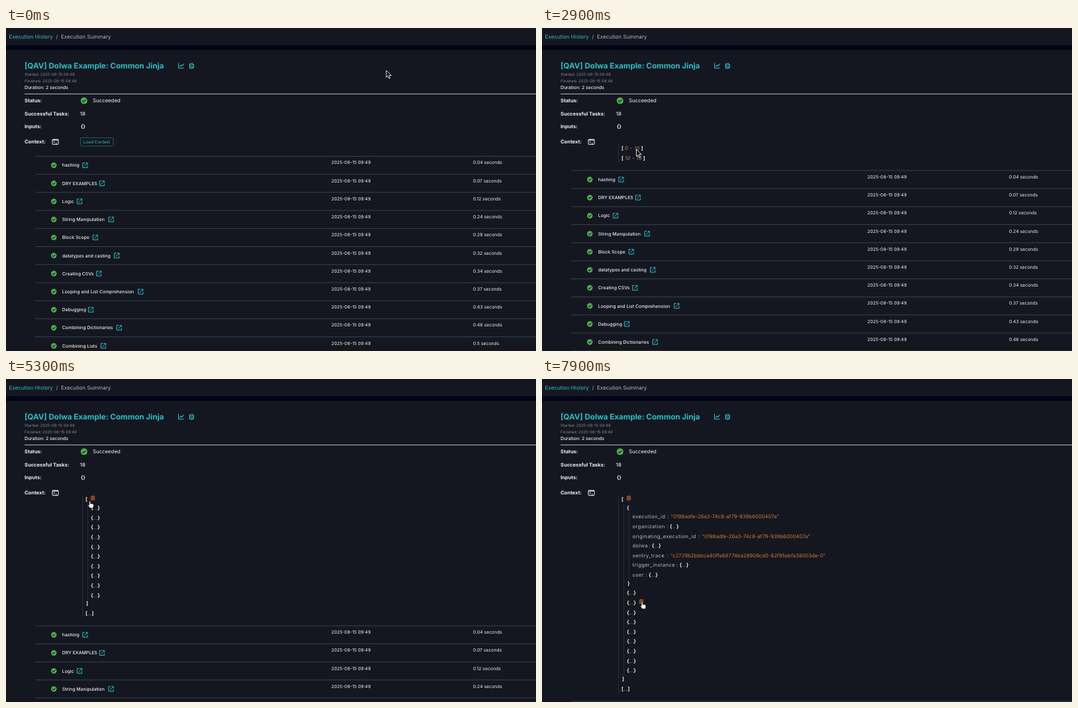
Recreate the animation shown at these times as an HTML page. Size 800x487 px, loop 8000 ms.

```html
<!DOCTYPE html>
<html lang="en">
<head>
<meta charset="utf-8">
<title>Execution Summary</title>
<style>
html, body { margin: 0; width: 100%; height: 100%; overflow: hidden; background: #151720; }
svg { display: block; width: 800px; height: 487px; }
text { font-family: Inter, "Open Sans", sans-serif; white-space: pre; text-rendering: geometricPrecision; }
</style>
</head>
<body>
<svg id="stage" viewBox="0 0 800 487" xmlns="http://www.w3.org/2000/svg"></svg>
<script>
const NS = "http://www.w3.org/2000/svg";
const TEAL = "#2bc0c4", WHITE = "#eceef0", GREY = "#b4b6bc", ORANGE = "#c9782f", BG = "#151720";
const stage = document.getElementById("stage");

function add(parent, tag, attrs, content) {
  const node = document.createElementNS(NS, tag);
  for (const key in attrs) node.setAttribute(key, attrs[key]);
  if (content !== undefined) node.textContent = content;
  parent.appendChild(node);
  return node;
}
const group = (parent = stage) => add(parent, "g", {});

// Text placed by its left edge and the middle of its capitals.
function label(parent, x, mid, content, size, fill = WHITE, weight = 400, extra = {}) {
  return add(parent, "text", { x, y: mid + size * 0.36, "font-size": size, fill, "font-weight": weight, ...extra }, content);
}
function line(parent, d, stroke, width = 1) {
  return add(parent, "path", { d, stroke, "stroke-width": width, fill: "none" });
}
function check(parent, x, y, r) {
  add(parent, "circle", { cx: x, cy: y, r, fill: "#4caf50" });
  line(parent, `M${x - r * .5} ${y}l${r * .36} ${r * .38}l${r * .68} ${-r * .72}`, BG, r * .24);
}
function openIcon(parent, x, y) {
  line(parent, `M${x - .4} ${y - 3.6}H${x - 3.6}V${y + 3.6}H${x + 3.6}V${y + .4}`, TEAL, 1);
  line(parent, `M${x + .8} ${y - 3.6}H${x + 3.6}V${y - .8}M${x + 3.5} ${y - 3.5}L${x - 1.6} ${y + 1.6}`, TEAL, 1);
}

// Page header
add(stage, "rect", { width: 800, height: 487, fill: BG });
add(stage, "rect", { y: 26, width: 800, height: 7, fill: "#030518" });
label(stage, 4.5, 13, "Execution History", 8, TEAL);
label(stage, 75.5, 13, "/", 8, GREY);
label(stage, 83, 13, "Execution Summary", 8, GREY);

// Summary
label(stage, 28, 56.5, "[QAV] Dolwa Example: Common Jinja", 11.6, TEAL, 650);
line(stage, "M260.5 52.8V60.5H268.3M262.2 58.3L264.4 56L265.8 57.2L268.2 54.2", TEAL, 1.1);
add(stage, "rect", { x: 277.6, y: 54, width: 5, height: 6.8, rx: 2.4, fill: "none", stroke: TEAL, "stroke-width": 1.2 });
line(stage, "M276 55H278M276 57.4H278M276 59.8H278M282.2 55H284.2M282.2 57.4H284.2M282.2 59.8H284.2M278.2 52.6L279.3 54M282 52.6L280.9 54M279 56.5H281.2M279 58.5H281.2", TEAL, .9);
label(stage, 28, 69.8, "Started: 2025-08-15 09:49", 5.95, "#85888f");
label(stage, 28, 79.4, "Finished: 2025-08-15 09:49", 5.95, "#85888f");
label(stage, 28, 89.3, "Duration: 2 seconds", 6.9, WHITE, 450);
line(stage, "M28 99.4H800", "#b9bbc0", 1);

[["Status:", 109.6], ["Successful Tasks:", 128.8], ["Inputs:", 148.2], ["Context:", 171.6]]
  .forEach(([name, y]) => label(stage, 28, y, name, 7.55, WHITE, 700));
check(stage, 117.8, 109.6, 5);
label(stage, 131, 109.6, "Succeeded", 7.8);
label(stage, 111.8, 128.8, "18", 7.7, WHITE, 500);
label(stage, 112.8, 148, "{}", 7.6, WHITE, 700);
add(stage, "rect", { x: 70, y: 168, width: 9, height: 7.6, rx: .8, fill: "none", stroke: WHITE, "stroke-width": 1 });
line(stage, "M70 168.8H79", WHITE, 1.4);
line(stage, "M71.8 170.6L73.5 172.2L71.8 173.8M74.6 174H77.2", WHITE, .9);

const button = group();
add(button, "rect", { x: 112.5, y: 165.5, width: 49.5, height: 12.5, rx: 1.5, fill: "none", stroke: "#245a62", "stroke-width": 1 });
label(button, 116.8, 171.8, "Load Context", 6.4, TEAL);

// Task list
const tasks = [
  ["hashing", 119.4, "0.04"], ["DRY EXAMPLES", 144.8, "0.07"], ["Logic", 111, "0.12"],
  ["String Manipulation", 158.6, "0.24"], ["Block Scope", 134.7, "0.29"],
  ["datatypes and casting", 167.2, "0.32"], ["Creating CSVs", 140.2, "0.34"],
  ["Looping and List Comprehension", 203.2, "0.37"], ["Debugging", 128, "0.43"],
  ["Combining Dictionaries", 170.7, "0.46"], ["Combining Lists", 147, "0.5"]
];
const list = group();
tasks.forEach(([name, iconX, secs], i) => {
  const y = 207 + i * 27.22;
  line(list, `M44 ${y - 13.6}H800`, "#31444b", 1);
  check(list, 72.2, y, 4.2);
  label(list, 84.8, y, name, 6.9, WHITE, 500);
  openIcon(list, iconX, y);
  label(list, 491, y - 4, "2025-08-15 09:49", 6.83);
  label(list, 705, y - 4, secs + " seconds", 6.83);
});

// Context tree
const SIZE = 7.7, STEP = 14.6;
const mark = (g, x, y, s) => label(g, x, y, s, SIZE, WHITE, 700);
const guide = (g, x, y1, y2) => line(g, `M${x} ${y1}V${y2}`, "#292d36", 1);
function folded(g, x, y, [open, close], dots) {
  const t = mark(g, x, y, "");
  add(t, "tspan", {}, open);
  add(t, "tspan", { fill: dots, "font-weight": 400 }, "...");
  add(t, "tspan", {}, close);
}
const foldedList = (g, y) => folded(g, 120, y, "[]", GREY);
const foldedItems = (g, y, count) => {
  for (let i = 0; i < count; i++) folded(g, 128, y + i * STEP, "{}", ORANGE);
};
function range(g, y, span, endX) {
  mark(g, 120, y, "[");
  label(g, 125, y, span, SIZE, "#a08c68", 400, { "font-style": "italic", "letter-spacing": .3 });
  mark(g, endX, y, "]");
}

const lines = group();
guide(lines, 115.5, 175, 203);

const firstRange = group(), firstFold = group(), nextRange = group(), nextFold = group();
range(firstRange, 181.2, "0 - 10", 149.6);
foldedList(firstFold, 181.2);
range(nextRange, 195.8, "10 - 19", 152.8);
foldedList(nextFold, 195.8);

const items = group();
guide(items, 115.5, 175, 360);
guide(items, 123.5, 188, 333);
mark(items, 120, 181.2, "[");
foldedItems(items, 194.5, 10);
mark(items, 121, 338.5, "]");
foldedList(items, 353);

const detail = group();
guide(detail, 115.5, 175, 474);
guide(detail, 123.5, 188, 447);
guide(detail, 131.5, 201, 303);
mark(detail, 120, 181.2, "[");
mark(detail, 128, 194.5, "{");
[
  ["execution_id", 189.3, "0198adfe-26a3-74c8-af79-939b6000407a"],
  ["organization", 188],
  ["originating_execution_id", 236.3, "0198adfe-26a3-74c8-af79-939b6000407a"],
  ["dolwa", 161],
  ["sentry_trace", 188.8, "c2729b2bbbca40ffa68774ba28909cd0-82f95ebfa38003de-0"],
  ["trigger_instance", 202.8],
  ["user", 156.2]
].forEach(([key, colonX, value], i) => {
  const y = 207.6 + i * 14.57;
  label(detail, 136.5, y, key, SIZE, GREY, 400, { "letter-spacing": .35 });
  label(detail, colonX, y, ":", SIZE, GREY);
  if (value) label(detail, colonX + 5, y, `"${value}"`, SIZE, ORANGE);
  else folded(detail, colonX + 4.8, y, "{}", ORANGE);
});
mark(detail, 129, 308, "}");
foldedItems(detail, 322.6, 9);
mark(detail, 121, 452.5, "]");
foldedList(detail, 467);

// Copy icons shown beside the hovered node
function copyIcon() {
  const g = group();
  add(g, "rect", { x: -2.7, y: -2.8, width: 5.4, height: 6, rx: .6, fill: "#5a3420", stroke: "#a85c2b", "stroke-width": .9 });
  line(g, "M-1.4 -3H1.4M-1.6 -.6H1.8M-1.6 1.2H1.2", "#b9672f", .9);
  return g;
}
const rootCopy = copyIcon(), itemCopy = copyIcon();

// Pointers, drawn from the tip
const arrow = group(), hand = group();
add(arrow, "path", { d: "M0 0V10.4L2.4 8.2L4.1 12.2L5.9 11.4L4.2 7.6H7.6Z", fill: "#0b0b0e", stroke: "#f5f5f5", "stroke-width": .9, "stroke-linejoin": "round" });
add(hand, "path", { d: "M-.9 .8Q0 -.6 .9 .8V4Q1.8 3.2 2.7 4.2Q3.6 3.6 4.3 4.6Q5.4 4.2 5.7 5.4V7.6Q5.6 9 4.9 10.6H.2Q-1 8.8 -2.6 6.6Q-2.8 5.4 -.9 6.2Z", fill: "#fafafa", stroke: "#111", "stroke-width": .6, "stroke-linejoin": "round" });

const LOOP = 8000, LOAD = 1300, OPEN_A = 3500, OPEN_B = 4200, HOVER = 4900, EXPAND = 5100, INSPECT = 6200;
const path = [
  [0, 574, 64], [300, 574, 64], [1100, 137.5, 172], [1600, 137.5, 172], [2300, 142.5, 183],
  [3500, 142.5, 183], [4000, 134, 195], [4300, 134, 195], [4700, 128.5, 186.5], [4800, 128.5, 186.5],
  [5000, 126.5, 184], [5400, 126.5, 184], [5900, 134.5, 196], [6900, 134.5, 196], [7600, 151, 336], [8000, 151, 336]
];
function pointer(t) {
  const i = path.findIndex(p => p[0] > t);
  const [t0, x0, y0] = path[i - 1], [t1, x1, y1] = path[i];
  const u = (t - t0) / (t1 - t0), k = u * u * (3 - 2 * u);
  return [x0 + (x1 - x0) * k, y0 + (y1 - y0) * k];
}
const show = (node, on) => node.setAttribute("display", on ? "inline" : "none");
const move = (node, x, y) => node.setAttribute("transform", `translate(${x} ${y})`);

function render(t) {
  const [x, y] = pointer(t);
  const small = t >= LOAD && t < EXPAND;
  show(button, t < LOAD);
  show(lines, small);
  show(firstRange, small && t < OPEN_A);
  show(firstFold, small && t >= OPEN_A);
  show(nextRange, small && t < OPEN_B);
  show(nextFold, small && t >= OPEN_B);
  show(items, t >= EXPAND && t < INSPECT);
  show(detail, t >= INSPECT);
  move(list, 0, t < LOAD ? 0 : t < EXPAND ? 21.5 : t < INSPECT ? 178.7 : 292.7);

  show(rootCopy, t >= EXPAND);
  move(rootCopy, 131, 179.4);
  show(itemCopy, t >= EXPAND && y >= 189);
  if (t < INSPECT) move(itemCopy, 150, 193);
  else if (y < 314) move(itemCopy, 139.3, 192.4);
  else move(itemCopy, 150, 321 + Math.round((y - 322.6) / STEP) * STEP);

  show(arrow, t < HOVER);
  show(hand, t >= HOVER);
  move(arrow, x, y);
  move(hand, x, y);
}

const start = performance.now();
function tick() {
  const t = (performance.now() - start) % LOOP;
  render(Math.floor(t / 100) * 100);
  requestAnimationFrame(tick);
}
render(0);
requestAnimationFrame(tick);
</script>
</body>
</html>
```
